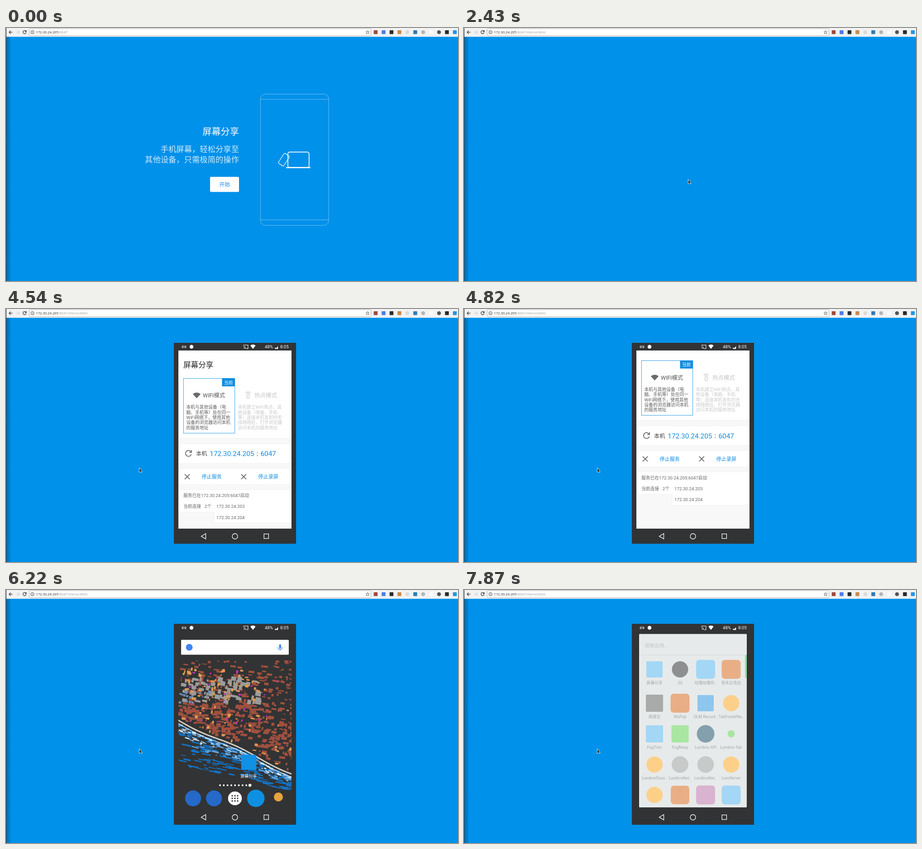
Write an HTML page that moves like this. It is 999 px wide and 561 px high and loops after 8000 ms.

```html
<!DOCTYPE html>
<html lang="zh-CN">
<head>
<meta charset="utf-8">
<title>屏幕分享</title>
<style>
  html, body { margin: 0; width: 100%; height: 100%; overflow: hidden; background: #0091ea; }
  svg { display: block; width: 100vw; height: 100vh; }
  text { font-family: Roboto, "Noto Sans CJK SC", "Noto Sans CJK", sans-serif; }
  .url { font-family: "Noto Sans", sans-serif; font-size: 7.7px; }
  .light { font-weight: 300; }
  .end { text-anchor: end; }
  .mid { text-anchor: middle; }
  .line { fill: none; stroke: #fff; }
  .blue { fill: #0f8ce0; }

  .anim { animation: 8s step-end infinite; }
  #intro { animation-name: intro; }
  #path { animation-name: path; }
  #reload { animation-name: reload; }
  #stop, #busy { animation-name: loading; }
  #cursor { animation-name: cursor; }
  #cast { animation-name: cast; }
  #app { animation-name: app; }
  #scroll { animation-name: scroll; }
  #press { animation-name: press; }
  #home { animation-name: home; }
  #drawer { animation-name: drawer; }

  @keyframes intro { 0% { opacity: 1 } 28.25%, 100% { opacity: 0 } }
  @keyframes path { 0% { opacity: 0 } 26.375%, 100% { opacity: 1 } }
  @keyframes reload { 0%, 30.375%, 100% { opacity: 1 } 23.5% { opacity: 0 } }
  @keyframes loading { 0%, 30.375%, 100% { opacity: 0 } 23.5% { opacity: 1 } }
  @keyframes cursor {
    0% { opacity: 0; transform: translate(834px, 122px) }
    11% { opacity: 1; transform: translate(834px, 122px); animation-timing-function: steps(3) }
    13.66% { opacity: 1; transform: translate(700px, 192px); animation-timing-function: steps(4) }
    17.2% { opacity: 1; transform: translate(530px, 306px); animation-timing-function: steps(3) }
    19.875% { opacity: 1; transform: translate(495.5px, 335.5px) }
    33.875% { opacity: 1; transform: translate(440px, 340px) }
    34.75% { opacity: 1; transform: translate(340px, 346px) }
    35.625% { opacity: 1; transform: translate(262px, 348px) }
    36.5% { opacity: 1; transform: translate(235px, 348px) }
    39.75% { opacity: 1; transform: translate(272px, 350px) }
    40.5%, 100% { opacity: 1; transform: translate(294.5px, 352px) }
  }
  @keyframes cast { 0% { opacity: 0 } 33.875%, 100% { opacity: 1 } }
  @keyframes app { 0% { opacity: 1 } 76.875%, 100% { opacity: 0 } }
  @keyframes scroll {
    0% { transform: translateY(0) }
    55% { transform: translateY(-1px) }
    55.875% { transform: translateY(-3px) }
    56.75% { transform: translateY(-5.5px) }
    57.625% { transform: translateY(-15px) }
    58.5% { transform: translateY(-27px) }
    59.375% { transform: translateY(-37px) }
    60.25% { transform: translateY(-45px) }
    62% { transform: translateY(-53px) }
    62.875%, 100% { transform: translateY(-56px) }
  }
  @keyframes press { 0%, 71.125%, 100% { opacity: 0 } 68.625% { opacity: .8 } 70.375% { opacity: .4 } }
  @keyframes home { 0% { opacity: 0 } 76.875% { opacity: .5 } 77.75% { opacity: 1 } 97.625% { opacity: .35 } 98.375%, 100% { opacity: 0 } }
  @keyframes drawer { 0% { opacity: 0 } 97.625% { opacity: .5 } 98.375%, 100% { opacity: 1 } }
</style>
</head>
<body>
<svg viewBox="0 0 999 561" preserveAspectRatio="none">
  <defs>
    <linearGradient id="shade">
      <stop offset="0" stop-color="#012a48" stop-opacity=".4"/>
      <stop offset="1" stop-color="#012a48" stop-opacity="0"/>
    </linearGradient>
    <clipPath id="screen"><path d="M381 92h250v395H381z"/></clipPath>
    <clipPath id="wall"><path d="M381 143h250v300H381z"/></clipPath>
    <path id="cross" d="M-5.5-5.5 5.5 5.5M5.5-5.5-5.5 5.5" fill="none" stroke="#666" stroke-width="1.7"/>
  </defs>

  <rect width="999" height="561" fill="#0091ea"/>
  <rect y="19" width="12" height="542" fill="url(#shade)"/>

  <!-- Browser bar -->
  <rect width="999" height="19.5" fill="#f2f2f2"/>
  <rect width="1" height="561" fill="#34434d"/>
  <rect x="51.5" y="1.5" width="755" height="15.5" rx="2" fill="#fff" stroke="#b4b4b4"/>
  <g fill="none" stroke="#3c3c3c" stroke-width="1.3">
    <path d="M14.5 9.3H7M10.5 5.6 6.8 9.3l3.7 3.7"/>
    <path d="M22 9.3h7.5M26 5.6l3.7 3.7L26 13" stroke="#d2d2d2"/>
    <path id="reload" class="anim" d="M44.2 7.4A3.5 3.5 0 1 0 44.5 10M44.8 5v3h-3"/>
    <path id="stop" class="anim" d="M38 6l6.4 6.6M44.4 6 38 12.600"/>
    <circle cx="58.500" cy="9.300" r="3.600" stroke-width="1"/>
    <path d="M58.500 8.800v2.500M58.500 6.900v1" stroke-width="1"/>
    <path d="M799.300 5.500l1.100 2.500 2.700.3-2 1.800.6 2.700-2.400-1.400-2.400 1.400.6-2.700-2-1.800 2.700-.3z" stroke-width=".8"/>
  </g>
  <text class="url" x="66" y="12" fill="#2e2e2e">172.30.24.205<tspan fill="#999">:6047</tspan><tspan id="path" class="anim"></tspan></text>
  <g id="pathText" class="anim" style="animation-name:path"><text class="url" x="136.300" y="12" fill="#999">/mirror.html</text></g>
  <g id="extensions"></g>

  <!-- Landing page -->
  <g id="intro" class="anim">
    <g fill="#fff" class="end">
      <text class="light" x="515" y="236.500" font-size="20.200">屏幕分享</text>
      <g class="light" font-size="17.330" opacity=".82">
        <text x="515" y="274.500">手机屏幕，轻松分享至</text>
        <text x="515" y="298">其他设备，只需极简的操作</text>
      </g>
    </g>
    <rect x="451" y="330" width="64" height="33.500" rx="2.500" fill="#fff"/>
    <text class="mid" x="483.300" y="351.300" font-size="11.700" font-weight="500" fill="#1e88e5">开始</text>
    <g class="line">
      <path d="M562 158h151.500M562 425.500h151.500" opacity=".42"/>
      <rect x="562.300" y="146.500" width="151" height="291" rx="11" opacity=".42"/>
      <rect x="623" y="275.200" width="46.800" height="34" rx="4" stroke-width="1.700"/>
      <path d="M619 309.700h54" stroke-width="2.200"/>
      <rect x="-7" y="-13" width="14" height="26" rx="2" transform="translate(614.200 292) rotate(33)" stroke-width="1.200"/>
    </g>
  </g>

  <!-- Mirrored phone -->
  <g id="cast" class="anim">
    <rect x="371" y="75" width="270" height="445.500" fill="#323334"/>

    <g id="app" class="anim" clip-path="url(#screen)">
      <rect x="381" y="92" width="250" height="395" fill="#f8f8f8"/>
      <g id="scroll" class="anim">
        <g fill="#fff" stroke="#ececec" stroke-width=".7">
          <path d="M380 80h252v212H380zM380 304h252v44H380zM380 359h252v36H380zM380 406h252v74H460v-24h-80z"/>
        </g>
        <text x="392" y="135.200" font-size="16.600" fill="#222">屏幕分享</text>
        <rect x="392.300" y="159.500" width="113.400" height="121.300" fill="none" stroke="#2f9fea"/>
        <rect class="blue" x="477.500" y="159" width="28.500" height="18"/>
        <text x="482" y="172.100" font-size="9.700" fill="#fff">当前</text>
        <path d="M412.800 194q8.700-6.500 17.400 0L421.500 203.500z" fill="#6a6a6a"/>
        <text x="435" y="201.500" font-size="12.300" fill="#555">WIFI模式</text>
        <g fill="none" stroke="#c4c4c4" stroke-width="1.200">
          <rect x="532.700" y="195.300" width="5" height="8" rx="1"/>
          <path d="M531.600 193.300q3.600-3 7.200 0M529.700 191.300q5.500-4.500 11 0"/>
        </g>
        <text x="549" y="201.500" font-size="12.500" fill="#c4c4c4">热点模式</text>
        <g id="modes" font-size="9.750"></g>

        <path d="M408.700 322a6.500 6.500 0 1 0 .9 5.500M410 318.500v4.800h-5" fill="none" stroke="#666" stroke-width="1.700"/>
        <text x="420" y="330.600" font-size="12.300" fill="#444">本机</text>
        <g font-size="15.300" class="blue">
          <text x="450.300" y="331.800">172.30.24.205</text>
          <text x="553.500" y="331.300" fill="#333">:</text>
          <text x="562.500" y="331.800">6047</text>
        </g>
        <use href="#cross" x="400.500" y="377.300"/>
        <use href="#cross" x="525.300" y="377.300"/>
        <g font-size="11.100" font-weight="500" class="blue">
          <text x="432.500" y="381.500">停止服务</text>
          <text x="557.500" y="381.500">停止录屏</text>
        </g>
        <g font-size="9.750" fill="#666">
          <text x="392" y="422.500">服务已在172.30.24.205:6047启动</text>
          <text x="392" y="446.800">当前连接</text>
          <text x="438.700" y="446.800">2个</text>
          <text x="465" y="446.800">172.30.24.203</text>
          <text x="465" y="471.200">172.30.24.204</text>
        </g>
      </g>
    </g>

    <g id="home" class="anim">
      <g id="wallpaper" clip-path="url(#wall)"></g>
      <rect x="387" y="110.500" width="238" height="33" rx="1.500" fill="#fff"/>
      <circle cx="405" cy="127" r="7.500" fill="#4285f4"/>
      <rect x="603.500" y="120.500" width="4.600" height="9" rx="2.300" fill="#4285f4"/>
      <path d="M601 127q.5 4.600 4.800 4.600t4.800-4.600M605.800 131.600v3" fill="none" stroke="#4285f4" stroke-width="1.400"/>
      <rect x="519.800" y="365.500" width="33.500" height="33.500" rx="2" fill="#1190e4"/>
      <text class="mid" x="536.500" y="415.800" font-size="9" fill="#fff">屏幕分享</text>
      <g fill="none" stroke="#fff" stroke-linecap="round">
        <path d="M473 433h58.200" stroke-width="4" stroke-dasharray="0 8.300"/>
        <path d="M539.200 433h.01" stroke-width="6.500"/>
      </g>
      <circle cx="413.500" cy="462" r="17.700" fill="#2569c9"/>
      <circle cx="459.700" cy="462" r="17.700" fill="#2569c9"/>
      <circle cx="506" cy="462" r="15.300" fill="#fff"/>
      <path d="M500 456.300h12.100M500 462h12.100M500 467.700h12.100" fill="none" stroke="#333" stroke-width="3.400" stroke-linecap="round" stroke-dasharray="0 6"/>
      <circle cx="552.200" cy="462" r="19.300" fill="#0e90e2"/>
      <circle cx="602" cy="459" r="10" fill="#e8a33c"/>
    </g>

    <g id="drawer" class="anim">
      <rect x="387" y="97.500" width="238" height="384.500" rx="1.500" fill="#e7eaea"/>
      <path d="M387 144h238" stroke="#d3d7d7"/>
      <path d="M624 195v286" stroke="#d3d7d7" stroke-width=".8"/>
      <rect x="621" y="144" width="4" height="51" fill="#92e3a4"/>
      <text x="400" y="127.300" font-size="10.600" fill="#c3c6c6">搜索应用...</text>
      <g id="grid" class="mid" font-size="8.800" fill="#a5a8a8"></g>
    </g>

    <!-- Status and navigation bars -->
    <g class="line" stroke-width="1.100">
      <path d="M392.500 81.800h-1.300a2 2 0 0 0 0 4h1.300M394.500 81.800h1.300a2 2 0 0 1 0 4h-1.300M391.500 83.800h4"/>
      <path d="M525.300 82v-2h9.500v8h-4M525.300 83.500q4 .5 4.500 4.700M525.300 86q1.700.4 2 2.200"/>
      <path d="M441.500 498v11.800l-10-5.900z" stroke-width="1.300"/>
      <circle cx="506" cy="504" r="6" stroke-width="1.300"/>
      <rect x="570.200" y="498.700" width="10.200" height="10.200" stroke-width="1.300"/>
    </g>
    <circle id="press" class="anim" cx="506" cy="504" r="6" fill="#fff"/>
    <g fill="#fff">
      <circle cx="410" cy="83.800" r="4.200"/>
      <path d="M540 81q5.800-4.300 11.600 0L545.800 88.500zM594.500 88.500v-3l3.500 1 3.200-4.500v6.500z"/>
      <g font-size="9.700">
        <text x="572" y="87.300">48%</text>
        <text x="606" y="87.300">8:05</text>
      </g>
    </g>
  </g>

  <g id="cursor" class="anim">
    <path d="M0 0V9.500H6.300Q5.500 5.500 0 0z" fill="#262626" stroke="#fff" stroke-width=".9"/>
    <circle id="busy" class="anim" cx="7.800" cy="2.500" r="2.300" fill="none" stroke="#fff" stroke-width="1.200"/>
  </g>
</svg>
<script>
  const put = (id, html) => { document.getElementById(id).innerHTML = html; };
  const square = (x, y, size, fill, rx = 2) =>
    `<rect x="${x - size / 2}" y="${y - size / 2}" width="${size}" height="${size}" rx="${rx}" fill="${fill}"/>`;
  const disc = (x, y, size, fill) => `<circle cx="${x}" cy="${y}" r="${size / 2}" fill="${fill}"/>`;

  // Toolbar buttons
  const tones = ['#a04a3e', '#4a7de8', '#2d2d2d', '#c98a4d', '#dadada', '#2f7cb5',
    '#b5b5b5', '#fbfbfb', '#555', '#2b2b2b', '#2196e8'];
  put('extensions', tones.map((c, i) =>
    (i === 4 || i === 6 || i === 8 ? disc : square)(817 + i * 17.5, 9.3, 8.5, c, 1)).join(''));

  // Mode descriptions
  const block = (x, fill, rows) => rows.map((row, i) =>
    `<text x="${x}" y="${226.7 + i * 11.4}" fill="${fill}">${row}</text>`).join('');
  put('modes',
    block(398.5, '#5a5a5a', ['本机与其他设备（电', '脑、手机等）处在同一', 'WiFi网络下，使用其他', '设备的浏览器访问本机', '的服务地址']) +
    block(512.5, '#c8c8c8', ['本机建立WiFi热点，其', '他设备（电脑、手机', '等）连接本机发射的无', '线网络后，打开浏览器', '访问本机的服务地址']));

  // Coastal wallpaper built from seeded flat patches
  let seed = 41;
  const rnd = (a = 0, b = 1) => {
    seed = (seed * 16807) % 2147483647;
    return a + (b - a) * seed / 2147483647;
  };
  const coast = x => 289 + (x - 381) * 0.47 + 3 * Math.sin((x - 381) / 28);
  const patches = (fill, count, w, h, tilt, place) => {
    let d = '';
    for (let i = 0; i < count; i++) {
      const [x, y] = place();
      const pw = rnd(w * 0.2, w), ph = rnd(h * 0.3, h);
      d += `M${x.toFixed(1)} ${y.toFixed(1)}l${pw.toFixed(1)} ${(pw * tilt).toFixed(1)} ${(-ph * 0.2).toFixed(1)} ${ph.toFixed(1)} ${(-pw).toFixed(1)} ${(-pw * tilt).toFixed(1)}z`;
    }
    return `<path d="${d}" fill="${fill}"/>`;
  };
  const box = (x0, y0, x1, y1) => () => [rnd(x0, x1), rnd(y0, y1)];
  const land = top => () => {
    const x = rnd(378, 631);
    return [x, rnd(top, coast(x) - 9)];
  };
  const sea = (depth, bias) => () => {
    const x = rnd(372, 631);
    return [x, coast(x) + 6 + rnd() ** bias * depth * (1 - (x - 381) / 380)];
  };
  const shore = shift => {
    let d = '';
    for (let x = 379; x <= 633; x += 6) d += `${d ? 'L' : 'M'}${x} ${(coast(x) + shift).toFixed(1)}`;
    return d;
  };
  const red = '#a0503f';
  put('wallpaper',
    patches(red, 70, 13, 5, 0.12, box(385, 155, 631, 200)) +
    patches(red, 110, 10, 6, 0.15, box(400, 185, 631, 250)) +
    patches(red, 360, 13, 7, 0.15, land(248)) +
    patches('#9b9b99', 85, 13, 11, 0.2, box(381, 190, 556, 243)) +
    patches('#6f8fb8', 24, 9, 5, 0.2, box(381, 222, 450, 248)) +
    patches('#e09a4e', 55, 9, 7, 0.15, box(390, 172, 570, 245)) +
    patches('#e09a4e', 36, 9, 7, 0.15, land(255)) +
    patches('#c92fc0', 26, 6, 5, 0.1, box(385, 170, 628, 300)) +
    patches('#1273c4', 190, 24, 3.5, 0.22, sea(88, 1.3)) +
    patches('#6aa6da', 110, 15, 3.5, 0.3, sea(42, 1.6)) +
    patches('#eef3f5', 70, 11, 3, 0.35, sea(26, 1.7)) +
    `<path d="${shore(0)}" fill="none" stroke="#d8d0c2" stroke-width="3"/>` +
    `<path d="${shore(7)}" fill="none" stroke="#c9e2f2" stroke-width="1.3"/>`);

  // App drawer: shape, size, colour, label
  const sky = '#a3d7f5', clay = '#e9ae86', sun = '#fdd08a', mint = '#a9e6a2', grey = '#c8cacA';
  const apps = [
    [square, 36, sky, '屏幕分享'], [disc, 36, '#8d8f90', 'ZQ'], [square, 42, sky, '咕噜咕噜听..'], [square, 42, clay, '青禾云电台'],
    [square, 38, '#a9abab', '南坡云'], [square, 42, clay, 'WuPop'], [square, 36, '#8fc6ef', 'QLM Record..'], [disc, 36, sun, 'TabFooterNa..'],
    [square, 38, sky, 'FogTrim'], [square, 38, mint, 'FogRelay'], [disc, 39, '#83a0ac', 'Lumbrix API'], [disc, 16, mint, 'Lumbrix Tab'],
    [disc, 36, sun, 'LumbrixSoun..'], [disc, 37, grey, 'LumbrixNet..'], [disc, 37, grey, 'LumbrixNet..'], [disc, 36, sun, 'LumServer'],
    [disc, 36, sun], [square, 41, clay], [square, 42, '#d9b3cf'], [square, 42, sky]
  ];
  const rowY = [176, 251, 319, 387, 454.5];
  put('grid', apps.map(([shape, size, fill, label = ''], i) => {
    const x = 421 + (i % 4) * 56.5, y = rowY[i >> 2];
    return shape(x, y, size, fill, size > 40 ? 7 : 2) + `<text x="${x}" y="${y + 33}">${label}</text>`;
  }).join(''));
</script>
</body>
</html>
```
